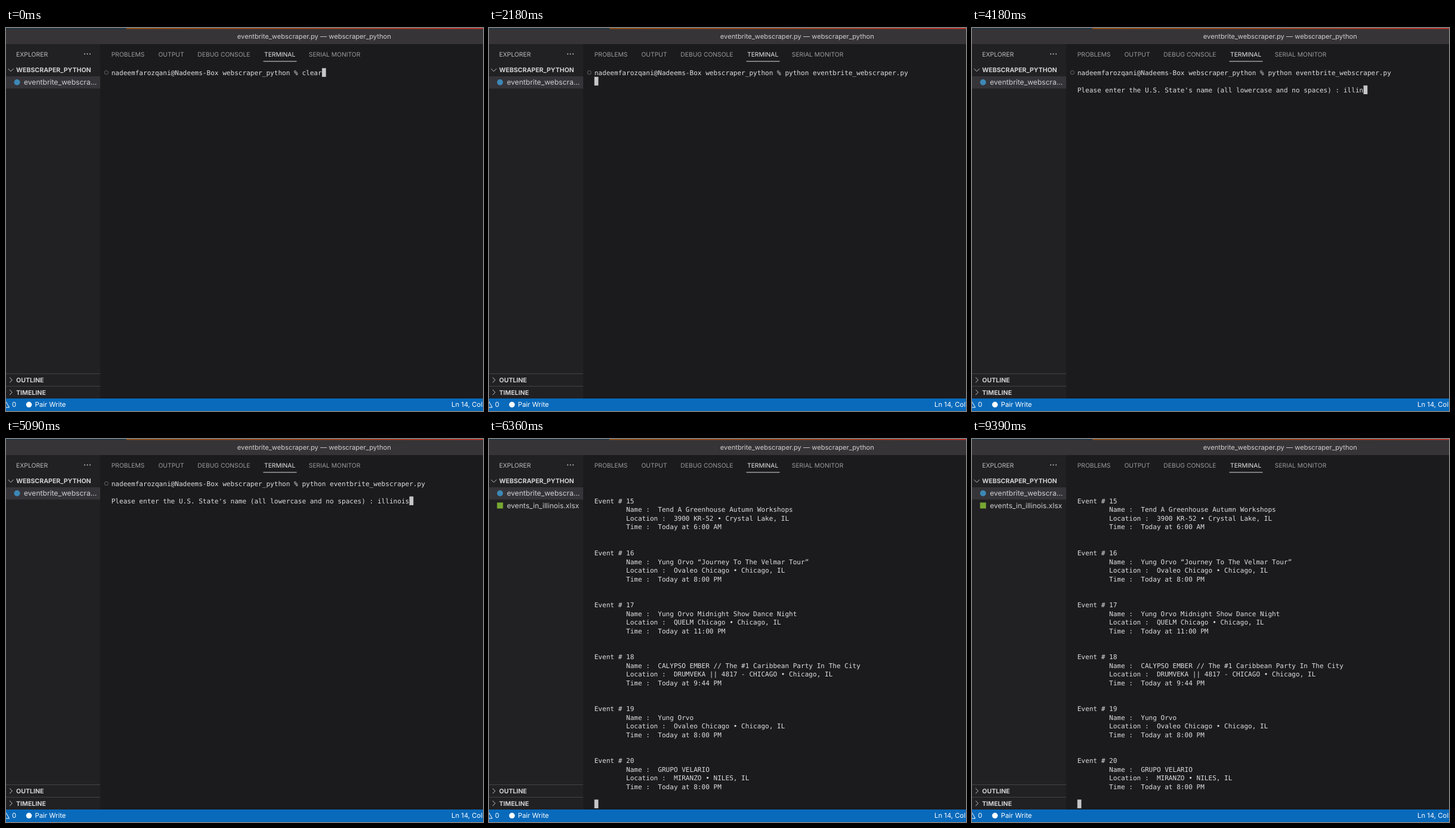
Recreate the animation shown at these times as an HTML page. Size 800 px wide and 642 px high, loop 9.45 s.

```html
<!DOCTYPE html>
<html lang="en">
<head>
<meta charset="utf-8">
<title>Terminal session</title>
<style>
  html, body { margin: 0; width: 100%; height: 100%; overflow: hidden; background: #1b1a1c; }
  svg { display: block; width: 800px; height: 642px; }
  text { font-family: Inter, "Open Sans", sans-serif; text-rendering: geometricPrecision; white-space: pre; }
  .title { font-size: 11.16px; fill: #d0cfd0; }
  .tab { font-size: 10.3px; fill: #9c9b9d; }
  .tab.on { fill: #e8e8e8; }
  .head { font-size: 10.4px; fill: #bdbcbe; }
  .section { font-size: 10.6px; font-weight: 700; fill: #d2d1d3; }
  .file { font-size: 12.1px; fill: #cfced0; }
  .status { font-size: 11.35px; fill: #fff; }
  #term text { font: 11.07px "DejaVu Sans Mono", "Liberation Mono", monospace; fill: #dedddf; }
  .line { fill: none; stroke: #c8c7c9; stroke-width: 1; }
</style>
</head>
<body>
<svg viewBox="0 0 800 642">
  <defs>
    <linearGradient id="strip">
      <stop offset="0" stop-color="#a0520c"/>
      <stop offset=".5" stop-color="#b0420f"/>
      <stop offset="1" stop-color="#cf3026"/>
    </linearGradient>
  </defs>
  <rect width="800" height="642" fill="#1b1a1c"/>
  <rect y="1" width="800" height="26" fill="#363437"/>
  <rect width="202" height="1.5" fill="#1b3846"/>
  <rect x="202" width="598" height="1.5" fill="url(#strip)"/>
  <text class="title" x="387.8" y="18">eventbrite_webscraper.py — webscraper_python</text>

  <rect y="27" width="158" height="594" fill="#212023"/>
  <rect y="81" width="158" height="20.5" fill="#353439"/>
  <text class="head" x="17" y="47.5">EXPLORER</text>
  <g fill="#c8c7c9">
    <circle cx="132" cy="43.5" r="1"/><circle cx="136.5" cy="43.5" r="1"/><circle cx="141" cy="43.5" r="1"/>
  </g>
  <path class="line" d="M3.5 68.2 8 72.7 12.5 68.2"/>
  <text class="section" x="17" y="74">WEBSCRAPER_PYTHON</text>
  <circle cx="18.5" cy="91" r="5" fill="#3d88b6"/>
  <text class="file" x="30" y="95">eventbrite_webscra...</text>
  <g id="sheet">
    <rect x="13.5" y="106.5" width="10" height="10" fill="#78a832"/>
    <text class="file" x="30" y="116">events_in_illinois.xlsx</text>
  </g>
  <path d="M0 579.5H158M0 600.5H158" stroke="#434245"/>
  <path class="line" d="M6 585.7 10.4 590 6 594.3M6 606.4 10.4 610.7 6 615"/>
  <text class="section" x="17" y="593.9">OUTLINE</text>
  <text class="section" x="17" y="614.6">TIMELINE</text>

  <text class="tab" x="176.7" y="47.5">PROBLEMS</text>
  <text class="tab" x="255.5" y="47.5">OUTPUT</text>
  <text class="tab" x="321.3" y="47.5">DEBUG CONSOLE</text>
  <text class="tab on" x="433" y="47.5">TERMINAL</text>
  <text class="tab" x="507.8" y="47.5">SERIAL MONITOR</text>
  <rect x="431.5" y="55.4" width="56" height="1" fill="#dddcde"/>

  <circle id="mark" cx="168.3" cy="74.6" r="3.1" fill="none" stroke="#69686b"/>
  <g id="term"></g>
  <rect id="cursor" width="6.7" height="14.6" fill="#c6c5c7"/>

  <rect y="621" width="800" height="21" fill="#096abc"/>
  <path d="M-5.5 636 0 626.5 5.5 636Z" fill="none" stroke="#fff"/>
  <text class="status" x="10" y="635.4">0</text>
  <circle cx="38.5" cy="631.3" r="4.8" fill="#fff"/>
  <text class="status" x="48.5" y="635.4">Pair Write</text>
  <text class="status" x="747" y="635.4">Ln 14, Col 1</text>
</svg>
<script>
const LOOP = 9450, LEFT = 176.7, ADVANCE = 6.665, LEADING = 14.516, ROWS = 38;
const PROMPT = "nadeemfarozqani@Nadeems-Box webscraper_python % ";
const COMMAND = "python eventbrite_webscraper.py";
const QUESTION = "Please enter the U.S. State's name (all lowercase and no spaces) : ";
const STATE = "illinois";
const AT = { clear: 270, run: 2090, ask: 2570, answer: 5360, output: 5720, sheet: 6060 };

// [time, characters of the command visible]; the last step is a completion
const KEYS = [[600, 1], [690, 2], [780, 3], [870, 4], [960, 5], [1050, 6],
  [1150, 7], [1300, 8], [1410, 9], [1500, 10], [1760, COMMAND.length]];

const EVENTS = [
  ["Tend A Greenhouse Autumn Workshops", "3900 KR-52 • Crystal Lake, IL", "6:00 AM"],
  ["Yung Orvo “Journey To The Velmar Tour”", "Ovaleo Chicago • Chicago, IL", "8:00 PM"],
  ["Yung Orvo Midnight Show Dance Night", "QUELM Chicago • Chicago, IL", "11:00 PM"],
  ["CALYPSO EMBER // The #1 Caribbean Party In The City", "DRUMVEKA || 4817 - CHICAGO • Chicago, IL", "9:44 PM"],
  ["Yung Orvo", "Ovaleo Chicago • Chicago, IL", "8:00 PM"],
  ["GRUPO VELARIO", "MIRANZO • NILES, IL", "8:00 PM"]
];
const pad = " ".repeat(8);
const output = ["", "", ...EVENTS.flatMap(([name, place, time], i) => [
  `Event # ${15 + i}`,
  `${pad}Name :  ${name}`,
  `${pad}Location :  ${place}`,
  `${pad}Time :  Today at ${time}`,
  "", ""
])];

const $ = id => document.getElementById(id);
const lines = Array.from({ length: ROWS }, (_, i) => {
  const el = document.createElementNS("http://www.w3.org/2000/svg", "text");
  el.setAttribute("x", LEFT);
  el.setAttribute("y", 78.9 + i * LEADING);
  return $("term").appendChild(el);
});

function screen(t) {
  if (t < AT.clear) return [PROMPT + "clear"];
  const count = KEYS.reduce((n, [at, shown]) => t >= at ? shown : n, 0);
  const rows = [PROMPT + COMMAND.slice(0, count)];
  if (t < AT.run) return rows;
  if (t < AT.ask) return [...rows, ""];
  if (t >= AT.output) return output;
  const typed = t < 3330 ? 0 : Math.floor((t - 3330) / 210) + 1;
  rows.push("", QUESTION + STATE.slice(0, typed));
  if (t >= AT.answer) rows.push("");
  return rows;
}

let last = "";
function draw(t) {
  const rows = screen(t);
  const key = rows.join("\n");
  $("sheet").style.display = t >= AT.sheet ? "" : "none";
  if (key === last) return;
  last = key;
  lines.forEach((el, i) => { el.textContent = rows[i] || ""; });
  const row = rows.length - 1;
  $("cursor").setAttribute("x", LEFT + rows[row].length * ADVANCE);
  $("cursor").setAttribute("y", 67.3 + row * LEADING);
  $("mark").style.display = t < AT.output ? "" : "none";
}

const start = performance.now();
function tick() {
  draw((performance.now() - start) % LOOP);
  requestAnimationFrame(tick);
}
tick();
</script>
</body>
</html>
```
